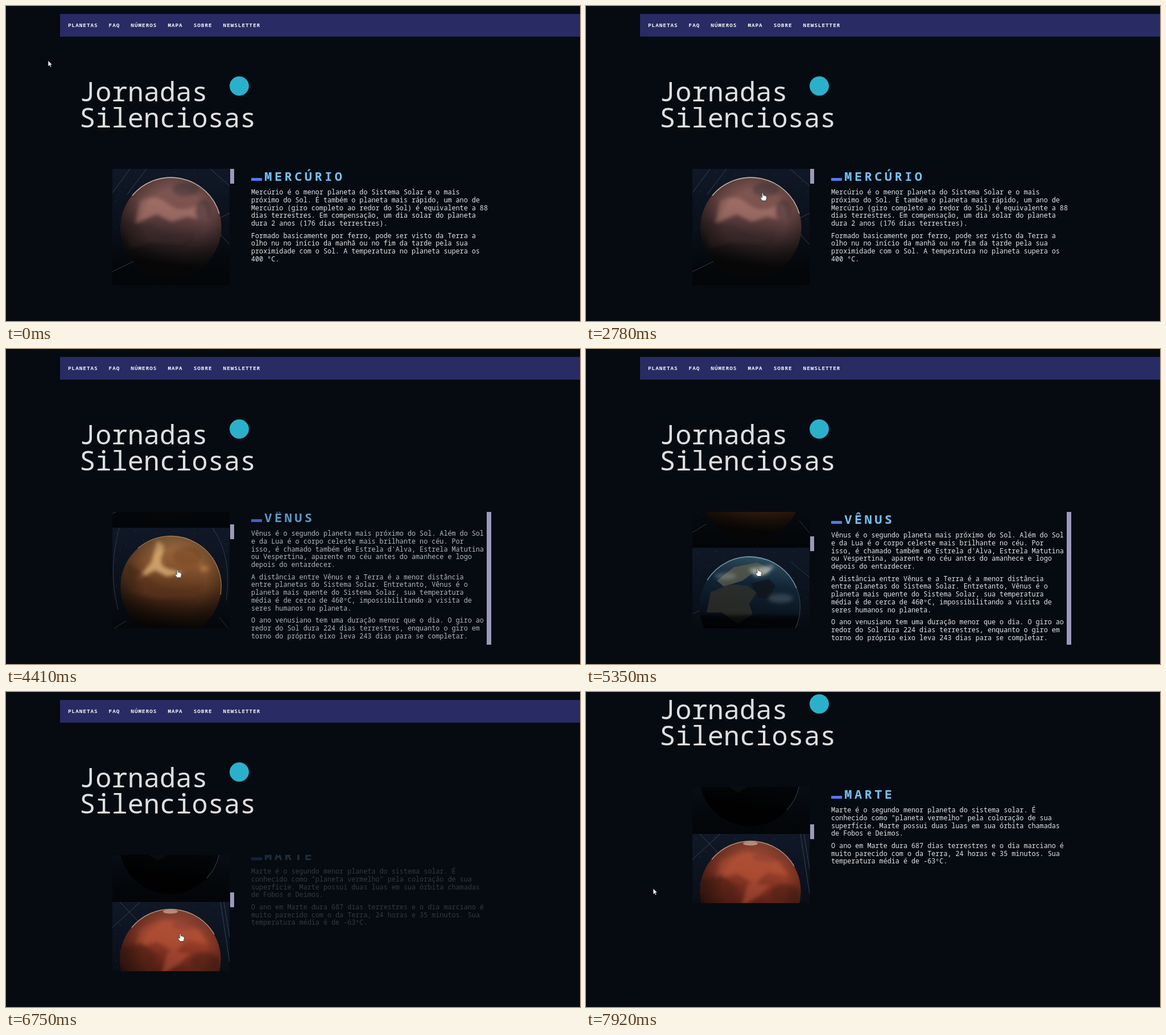
These frames come from a looping animation (1009 px wide and 555 px high, 8 s). An HTML page:

```html
<!DOCTYPE html>
<html lang="pt-BR">
<head>
<meta charset="utf-8">
<title>Jornadas Silenciosas</title>
<style>
@property --scroll { syntax: "<number>"; inherits: true; initial-value: 0; }
@property --hand { syntax: "<number>"; inherits: true; initial-value: 0; }

html, body { margin: 0; width: 100%; height: 100%; overflow: hidden; background: #060b11; }
body { position: relative; font: 500 11.76px/13.75px "Noto Sans Mono", "DejaVu Sans Mono", monospace; color: #e4e5e7; }
body * { margin: 0; box-sizing: border-box; }
#page, #page div, #page h1, #page nav, #cursor { position: absolute; }
#page, .info, #hover, #menu, #gallery, #bar, #cursor, .last { animation: 8s linear infinite; }
#page { inset: 0; animation-name: page; }

nav { left: 95px; top: 14px; width: 914px; height: 40px; background: #282b64; }
#links, #menu { font-size: 9.408px; line-height: 12px; font-weight: 700; letter-spacing: .941px; white-space: pre; color: #f3f3f5; }
#links { left: 109px; top: 28px; display: flex; gap: 19px; }
#hover { top: 19px; height: 30px; background: #1c1d42; animation: hover 8s step-end infinite; }

h1 { left: 129px; top: 126.8px; font-size: 47.04px; line-height: 46px; font-weight: 400; white-space: pre; color: #dedfe0; }
#logo { left: 393px; top: 124px; width: 34px; height: 34px; border-radius: 50%; background: #2bb0cc; }

#menu { left: 320px; top: 54px; width: 123px; height: 144px; padding: 12.7px 14.4px; background: #4c4e5a; border: 1px solid #bbbcc2; animation-name: menu; }
#menu::before { content: ""; position: absolute; left: 4px; top: -6px; border: 6px solid transparent; border-width: 5px 6px 0; border-top-color: #bbbcc2; }
#menu p { margin-bottom: 18.3px; }
#menu .last { line-height: 11.7px; animation: pick 8s step-end infinite; }

#gallery { left: 187px; top: 287px; width: 214px; height: 205px; overflow: hidden; animation-name: gallery; }
#gallery svg { display: block; transform: translateY(calc(var(--scroll) * -1px)); }
#thumb { left: 207px; top: 0; width: 7px; height: 26px; background: #9d99b9; transform: translateY(calc(var(--scroll) * .1237px)); }

#panel { left: 431px; top: 287px; width: 422px; height: 234px; overflow: hidden; }
.info { left: 0; top: 0; width: 416px; white-space: pre; }
.info h2 { position: absolute; left: 23.3px; top: -2.6px; font-size: 22.05px; line-height: 30px; letter-spacing: 4.41px; color: #74c0f5; }
.info::before { content: ""; position: absolute; left: 0; top: 16px; width: 19px; height: 5px; background: #5279f0; }
.info p { margin-bottom: 7.75px; }
.info h2 + p { margin-top: 34.2px; }
#mercury { animation-name: mercury; }
#venus { animation-name: venus; }
#mars { animation-name: mars; }
#bar { right: 0; top: 0; width: 8px; height: 234px; background: #9d99b9; animation: bar 8s step-end infinite; }

#cursor { left: 0; top: 0; overflow: visible; animation: move 8s linear infinite, hand 8s step-end infinite; }
#cursor path { fill: #fff; stroke: #111; stroke-width: .8; stroke-linejoin: round; }
#cursor .arrow { opacity: calc(1 - var(--hand)); }
#cursor .pointer { opacity: var(--hand); }

@keyframes page {
  0%, 90% { transform: none; animation-timing-function: ease-in-out; }
  98.5%, 100% { transform: translateY(-120px); }
}
@keyframes hover {
  0% { opacity: 0; left: 100px; width: 71px; }
  8% { opacity: 1; left: 100px; width: 71px; }
  9.2% { opacity: 1; left: 171.5px; width: 39px; }
  10.6% { opacity: 1; left: 210.5px; width: 65px; }
  13% { opacity: 1; left: 275.5px; width: 45px; }
  14.9% { opacity: 1; left: 320.5px; width: 51.5px; }
  30.8%, 100% { opacity: 0; left: 320.5px; width: 51.5px; }
}
@keyframes menu {
  0%, 14.9% { opacity: 0; }
  21.2%, 30.79% { opacity: 1; }
  30.8%, 100% { opacity: 0; }
}
@keyframes pick {
  0%, 30.8%, 100% { color: #f3f3f5; }
  28.5% { color: #74c0f5; }
}
@keyframes gallery {
  0%, 40.4% { --scroll: 0; }
  46.4%, 62.5% { --scroll: 178; }
  66.875% { --scroll: 348; animation-timing-function: ease-out; }
  73%, 100% { --scroll: 535; }
}
@keyframes mercury {
  0%, 50.89% { opacity: 1; }
  50.9%, 100% { opacity: 0; }
}
@keyframes venus {
  0%, 50.9% { opacity: 0; transform: translateY(-14.7px); animation-timing-function: ease; }
  59.6%, 82.99% { opacity: 1; transform: none; }
  83%, 100% { opacity: 0; transform: none; }
}
@keyframes mars {
  0%, 83% { opacity: 0; transform: translateY(-14.7px); animation-timing-function: ease; }
  91.5%, 100% { opacity: 1; transform: none; }
}
@keyframes bar {
  0%, 83%, 100% { opacity: 0; }
  50.9% { opacity: 1; }
}
@keyframes hand {
  0%, 30.8%, 94%, 100% { --hand: 0; }
  7.8%, 32.9% { --hand: 1; }
}
@keyframes move {
  0%, 4.5% { transform: translate(74px, 96px); }
  5.5% { transform: translate(82px, 84px); }
  7% { transform: translate(112px, 58px); }
  8.5% { transform: translate(150px, 36px); }
  10.375% { transform: translate(208px, 36px); }
  12.25% { transform: translate(260px, 34px); }
  15.25% { transform: translate(328px, 32px); }
  16.75% { transform: translate(338px, 32px); }
  18.625% { transform: translate(338px, 40px); }
  26.125% { transform: translate(346px, 126px); }
  29.5% { transform: translate(346px, 177px); }
  31.375% { transform: translate(300px, 244px); }
  33.25% { transform: translate(303px, 300px); }
  34.75% { transform: translate(310.5px, 328.5px); }
  36.6% { transform: translate(313.5px, 351px); }
  40% { transform: translate(314px, 355px); }
  46.4% { transform: translate(300px, 383px); }
  53.25% { transform: translate(300.5px, 385px); }
  55.125%, 62.5% { transform: translate(301.5px, 388.5px); }
  66.875% { transform: translate(302px, 386px); }
  73% { transform: translate(306px, 338px); }
  79.1% { transform: translate(306px, 424px); }
  84.375% { transform: translate(306.5px, 425px); }
  86.25% { transform: translate(288px, 408px); }
  89.6% { transform: translate(246px, 380px); }
  99%, 100% { transform: translate(118px, 346px); }
}
</style>
</head>
<body>
<div id="page">
  <nav></nav>
  <div id="hover"></div>
  <div id="links"><span>PLANETAS</span><span>FAQ</span><span>NÚMEROS</span><span>MAPA</span><span>SOBRE</span><span>NEWSLETTER</span></div>
  <h1>Jornadas
Silenciosas</h1>
  <div id="logo"></div>

  <div id="gallery">
    <svg width="206" height="824">
      <defs>
        <linearGradient id="sky" x2="0" y2="1">
          <stop offset="0" stop-color="#101827"/><stop offset=".5" stop-color="#0a101a"/><stop offset=".8" stop-color="#05080c"/><stop offset="1" stop-color="#030507"/>
        </linearGradient>
        <linearGradient id="rock" x1=".6" x2=".45" y2="1">
          <stop offset="0" stop-color="#c9a596"/><stop offset=".08" stop-color="#7d5753"/><stop offset=".3" stop-color="#7d534f"/><stop offset=".48" stop-color="#503637"/><stop offset=".66" stop-color="#241b1c"/><stop offset=".82" stop-color="#080809"/>
        </linearGradient>
        <linearGradient id="gold" x1=".55" x2=".45" y2="1">
          <stop offset="0" stop-color="#a47347"/><stop offset=".3" stop-color="#8b5832"/><stop offset=".5" stop-color="#60391f"/><stop offset=".68" stop-color="#2d190d"/><stop offset=".85" stop-color="#080605"/>
        </linearGradient>
        <linearGradient id="sea" x1=".6" x2=".45" y2="1">
          <stop offset="0" stop-color="#7fa6b8"/><stop offset=".1" stop-color="#2a4759"/><stop offset=".3" stop-color="#112435"/><stop offset=".55" stop-color="#0a131f"/><stop offset=".75" stop-color="#030507"/>
        </linearGradient>
        <linearGradient id="rust" x1=".58" x2=".42" y2="1">
          <stop offset="0" stop-color="#cf9780"/><stop offset=".1" stop-color="#9a4a36"/><stop offset=".32" stop-color="#9a3f2a"/><stop offset=".5" stop-color="#702a1d"/><stop offset=".7" stop-color="#36140e"/><stop offset="1" stop-color="#060505"/>
        </linearGradient>
        <radialGradient id="shade" cx=".54" cy=".44" r=".56">
          <stop offset=".55" stop-color="#050505" stop-opacity="0"/><stop offset="1" stop-color="#050505" stop-opacity=".5"/>
        </radialGradient>
        <pattern id="stars" width="69" height="47" patternUnits="userSpaceOnUse">
          <path d="M6 9h1M23 31h1M40 6h1M54 22h1M62 41h1M13 40h1" stroke="#6d7f96" opacity=".5"/>
        </pattern>
        <filter id="soft"><feGaussianBlur stdDeviation="3"/></filter>
        <clipPath id="ball"><circle cx="103" cy="103" r="88.5"/></clipPath>
        <circle id="dusk" cx="103" cy="103" r="88.5" fill="url(#shade)"/>
        <g id="space" fill="none">
          <rect width="206" height="206" fill="url(#sky)"/>
          <rect width="206" height="120" fill="url(#stars)"/>
        </g>
      </defs>

      <g>
        <use href="#space"/>
        <path d="M31 0L0 42M60 0L26 45M172 0L206 30M206 78L190 86M186 112L206 133M0 181L37 163" stroke="#4b5563" stroke-width=".7"/>
        <g clip-path="url(#ball)">
          <rect width="206" height="206" fill="url(#rock)"/>
          <g filter="url(#soft)">
            <path d="M48 56Q75 43 96 60T145 66 166 92L132 84 104 93 78 80 40 96Z" fill="#ad776e" opacity=".7"/>
            <ellipse cx="129" cy="36" rx="23" ry="12" fill="#503c3f" opacity=".7"/>
            <ellipse cx="160" cy="74" rx="14" ry="20" fill="#513b3d" opacity=".7"/>
            <path d="M20 95Q55 88 76 109T143 115L122 132 66 130 30 140Z" fill="#3c292b" opacity=".55"/>
          </g>
          <use href="#dusk"/>
        </g>
        <path d="M35 47A88.5 88.5 0 0 1 188 79" fill="none" stroke="#e9d3c5" stroke-width="1.6" opacity=".75"/>
      </g>

      <g transform="translate(0 206)">
        <use href="#space"/>
        <path d="M12 0Q-8 75 10 144M176 0Q211 50 200 128M0 179L24 164M188 158L206 180" fill="none" stroke="#404b50" stroke-width=".7"/>
        <g clip-path="url(#ball)">
          <rect width="206" height="206" fill="url(#gold)"/>
          <g filter="url(#soft)">
            <path d="M78 22Q96 28 88 47T98 72L126 79 96 86 75 75 43 91 69 60Z" fill="#e2b779" opacity=".75"/>
            <ellipse cx="132" cy="50" rx="25" ry="17" fill="#794723" opacity=".55"/>
            <path d="M27 64Q64 83 80 102T158 102L145 123 82 125 30 113Z" fill="#5a3219" opacity=".65"/>
            <ellipse cx="162" cy="72" rx="9" ry="6" fill="#c88a50" opacity=".5"/>
          </g>
          <use href="#dusk"/>
        </g>
        <path d="M45 36A88.5 88.5 0 0 1 190 118" fill="none" stroke="#dba66c" stroke-width="1.3" opacity=".6"/>
      </g>

      <g transform="translate(0 412)">
        <use href="#space"/>
        <path d="M172 24L206 52M0 116L13 111" stroke="#374454" stroke-width=".7"/>
        <g transform="translate(-2 1)">
          <g clip-path="url(#ball)">
            <rect width="206" height="206" fill="url(#sea)"/>
            <path d="M45 57L75 33 116 25 142 37 126 48 106 45 90 57 57 67Z" fill="#5c5d4b" opacity=".75"/>
            <path d="M34 77L68 63 99 66 115 78 102 98 108 116 82 133 54 113 27 113Z" fill="#34332a" opacity=".7"/>
            <path d="M105 62L137 54 148 66 136 88 119 87Z" fill="#101318" opacity=".75"/>
            <g filter="url(#soft)">
              <path d="M101 36L147 30 133 45 114 50Z" fill="#c5d1d1" opacity=".65"/>
              <ellipse cx="157" cy="88" rx="22" ry="8" fill="#73818a" opacity=".35"/>
              <ellipse cx="60" cy="49" rx="19" ry="6" fill="#a2b3b6" opacity=".35"/>
              <path d="M10 118H196V206H10Z" fill="#030507" opacity=".7"/>
            </g>
          </g>
          <path d="M28 56A88.5 88.5 0 0 1 185 70" fill="none" stroke="#a8d1e2" stroke-width="1.7" opacity=".6"/>
          <path d="M185 70A88.5 88.5 0 0 1 168 163" fill="none" stroke="#526675" stroke-width="1.2" opacity=".5"/>
        </g>
      </g>

      <g transform="translate(0 618)">
        <use href="#space"/>
        <path d="M0 45L49 0M13 0L54 43M190 0L206 105M196 0L206 62" stroke="#4b5563" stroke-width=".7"/>
        <g transform="translate(-1 -2)">
          <g clip-path="url(#ball)">
            <rect width="206" height="206" fill="url(#rust)"/>
            <g filter="url(#soft)">
              <path d="M50 48L91 31 151 48 171 75 132 69 111 92 80 72 40 83Z" fill="#b8553a" opacity=".6"/>
              <ellipse cx="133" cy="43" rx="27" ry="9" fill="#8a3d31" opacity=".5"/>
              <path d="M15 84L52 73 82 99 64 127 26 130Z" fill="#4b1d17" opacity=".6"/>
              <path d="M98 89L138 92 121 109 87 131Z" fill="#b8553a" opacity=".55"/>
              <ellipse cx="163" cy="108" rx="25" ry="17" fill="#4d2018" opacity=".6"/>
            </g>
            <use href="#dusk"/>
            <ellipse cx="103" cy="19" rx="13" ry="3.5" fill="#d9b5a4" opacity=".65"/>
          </g>
          <path d="M35 47A88.5 88.5 0 0 1 180 59" fill="none" stroke="#e3b7a0" stroke-width="1.5" opacity=".7"/>
        </g>
      </g>
    </svg>
    <div id="thumb"></div>
  </div>

  <div id="panel">
    <div class="info" id="mercury"><h2>MERCÚRIO</h2><p>Mercúrio é o menor planeta do Sistema Solar e o mais
próximo do Sol. É também o planeta mais rápido, um ano de
Mercúrio (giro completo ao redor do Sol) é equivalente a 88
dias terrestres. Em compensação, um dia solar do planeta
dura 2 anos (176 dias terrestres).</p><p>Formado basicamente por ferro, pode ser visto da Terra a
olho nu no início da manhã ou no fim da tarde pela sua
proximidade com o Sol. A temperatura no planeta supera os
400 °C.</p></div>
    <div class="info" id="venus"><h2>VÊNUS</h2><p>Vênus é o segundo planeta mais próximo do Sol. Além do Sol
e da Lua é o corpo celeste mais brilhante no céu. Por
isso, é chamado também de Estrela d'Alva, Estrela Matutina
ou Vespertina, aparente no céu antes do amanhece e logo
depois do entardecer.</p><p>A distância entre Vênus e a Terra é a menor distância
entre planetas do Sistema Solar. Entretanto, Vênus é o
planeta mais quente do Sistema Solar, sua temperatura
média é de cerca de 460ºC, impossibilitando a visita de
seres humanos no planeta.</p><p>O ano venusiano tem uma duração menor que o dia. O giro ao
redor do Sol dura 224 dias terrestres, enquanto o giro em
torno do próprio eixo leva 243 dias para se completar.</p></div>
    <div class="info" id="mars"><h2>MARTE</h2><p>Marte é o segundo menor planeta do sistema solar. É
conhecido como "planeta vermelho" pela coloração de sua
superfície. Marte possui duas luas em sua órbita chamadas
de Fobos e Deimos.</p><p>O ano em Marte dura 687 dias terrestres e o dia marciano é
muito parecido com o da Terra, 24 horas e 35 minutos. Sua
temperatura média é de -63ºC.</p></div>
    <div id="bar"></div>
  </div>

  <div id="menu"><p>O PROJETO</p><p>A EMPRESA</p><p>A EQUIPE</p><p class="last">OS
CONTRIBUIDORES</p></div>
</div>

<svg id="cursor" width="12" height="16">
  <path class="arrow" d="M0 0V10.6L2.5 8.4 4.2 12 5.9 11.2 4.3 7.8H7.5Z"/>
  <path class="pointer" d="M-1.2 1Q0 -.6 1.2 1V5Q2.6 4.2 3.4 5.5 4.8 5 5.5 6.3 7 6 7 7.6V10.5L5.6 14.5H-.8L-4.2 9.6Q-4.2 7.6-2.4 8.2L-1.2 9.2Z"/>
</svg>
</body>
</html>
```
